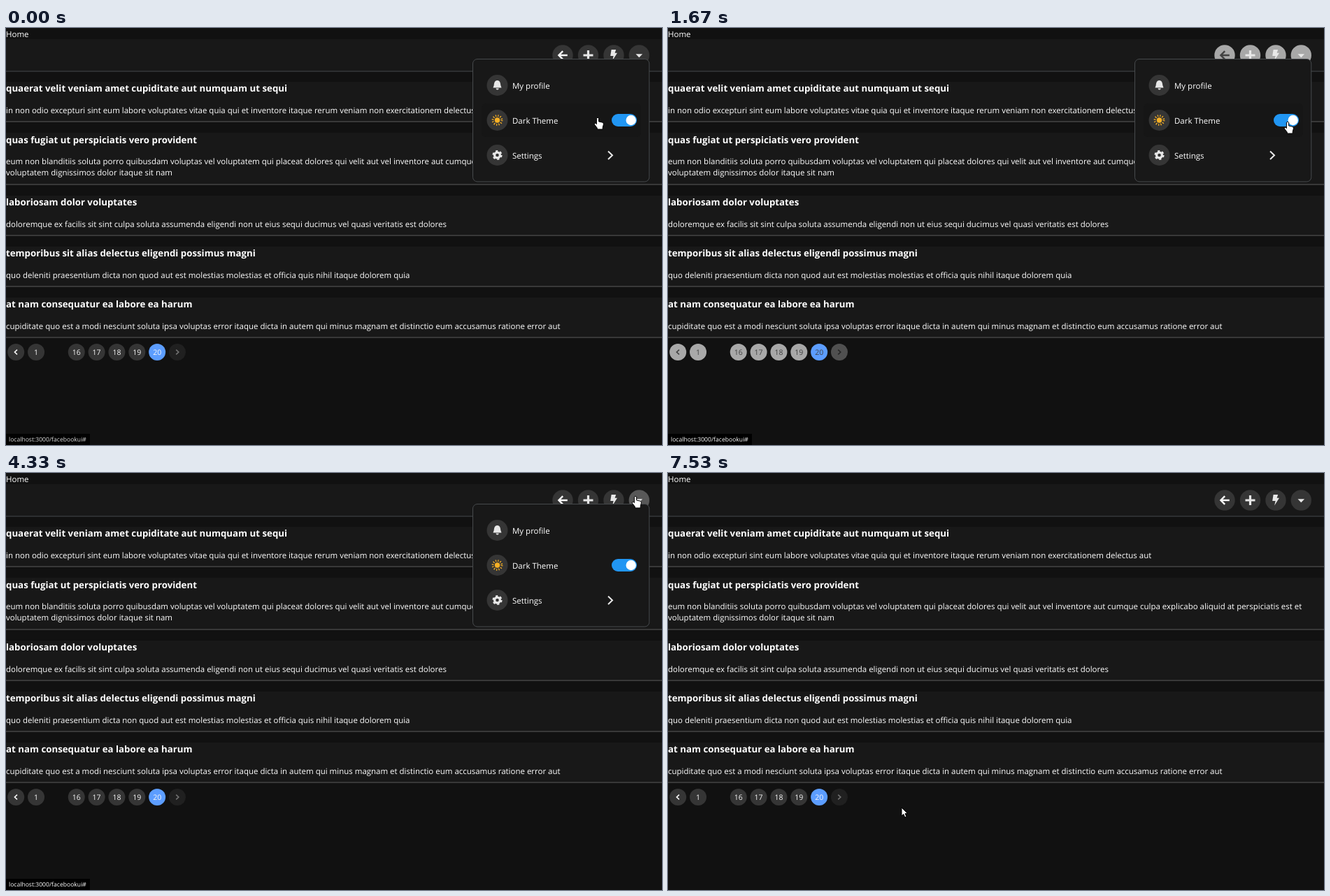
An HTML page that plays this animation: 938x597 px, repeating every 7940 ms.

```html
<!DOCTYPE html>
<html lang="en">
<head>
<meta charset="utf-8">
<title>Dropdown menu and pagination</title>
<style>
html, body { margin: 0; width: 100%; height: 100%; overflow: hidden; background: #111; }
svg { display: block; width: 938px; height: 597px; font: 11.48px "Open Sans", "Noto Sans", sans-serif; text-rendering: geometricPrecision; }
text { fill: var(--ink); white-space: pre; }
.title { font-size: 13.28px; font-weight: 700; }
.page { fill: var(--page); }
.card { fill: var(--card); }
.rule { fill: var(--rule); }
.btn { fill: var(--btn); }
.disc { fill: var(--disc); }
.fade { fill: none; stroke: var(--fade); }
.icon { fill: var(--icon); }
.line { fill: none; stroke: var(--icon); }
.pager text { font-size: 10.5px; text-anchor: middle; fill: var(--fade); }
.pager circle { stroke: var(--ring); }
.pager .dots { fill: var(--dots); }
.status { font-size: 8.6px; fill: #fff; }
</style>
</head>
<body>
<svg id="stage" viewBox="0 0 938 597"></svg>
<script>
const LOOP = 7940;
const SLIDE = 248;
const stage = document.getElementById('stage');

const lastPage = [
  ['quaerat velit veniam amet cupiditate aut numquam ut sequi',
    'in non odio excepturi sint eum labore voluptates vitae quia qui et inventore itaque rerum veniam non exercitationem delectus aut'],
  ['quas fugiat ut perspiciatis vero provident',
    'eum non blanditiis soluta porro quibusdam voluptas vel voluptatem qui placeat dolores qui velit aut vel inventore aut cumque culpa explicabo aliquid at perspiciatis est et',
    'voluptatem dignissimos dolor itaque sit nam'],
  ['laboriosam dolor voluptates',
    'doloremque ex facilis sit sint culpa soluta assumenda eligendi non ut eius sequi ducimus vel quasi veritatis est dolores'],
  ['temporibus sit alias delectus eligendi possimus magni',
    'quo deleniti praesentium dicta non quod aut est molestias molestias et officia quis nihil itaque dolorem quia'],
  ['at nam consequatur ea labore ea harum',
    'cupiditate quo est a modi nesciunt soluta ipsa voluptas error itaque dicta in autem qui minus magnam et distinctio eum accusamus ratione error aut'],
];
const otherPage = [
  ['placeat quia et porro iste',
    'quasi excepturi consequatur iste autem temporibus sed molestiae beatae et quaerat et esse ut voluptatem occaecati et vel explicabo autem asperiores pariatur deserunt optio'],
  ['nostrum quis quasi placeat',
    'eos et molestiae nesciunt ut a dolores perspiciatis repellendus repellat aliquid magnam sint rem ipsum est'],
  ['sapiente omnis fugit eos',
    'consequatur omnis est praesentium ducimus non iste neque hic deserunt voluptatibus veniam cum et rerum sed'],
  ['sint soluta et vel magnam aut ut sed qui',
    'repellat aut aperiam totam temporibus autem et architecto magnam ut consequatur qui cupiditate rerum quia soluta dignissimos nihil iure tempore quas est'],
  ['ad iusto omnis odit dolor voluptatibus',
    'minus omnis soluta quia qui sed adipisci voluptates illum ipsam voluptatem eligendi officia ut in eos soluta similique molestias praesentium blanditiis'],
];

// Markup helpers
const rect = (x, y, w, h, attrs = '') => `<rect x="${x}" y="${y}" width="${w}" height="${h}" ${attrs}/>`;
const label = (x, y, s, attrs = '') => `<text x="${x}" y="${Math.round(y)}" ${attrs}>${s}</text>`;
const at = (x, y, body, attrs = '') => `<g transform="translate(${x} ${y})" ${attrs}>${body}</g>`;

function posts(list) {
  let y = 77;
  return list.map(([title, ...lines]) => {
    const extra = lines.length - 1;
    const edge = Math.round(y + 56.3 + 16.2 * extra);
    const top = Math.round(y);
    const out = rect(0, top, 938, edge - top, 'class="card"') +
      rect(0, edge, 938, 2, 'class="rule"') +
      label(0, y + 14.3, title, 'class="title"') +
      lines.map((s, i) => label(0, y + 45 + 16 * i, s)).join('');
    y += 73.2 + 16.2 * extra;
    return out;
  }).join('');
}

const arrowLeft = '<path d="M6.8 0H-5.4M.2 -5.8L-5.6 0L.2 5.8" stroke-width="2.4"/>';
const gear = `<circle r="3.9" class="line" stroke-width="3.2"/>
  <circle r="5.9" class="line" stroke-width="2.4" stroke-dasharray="3.1 3.08"/>`;
const bell = '<path class="icon" d="M0 -7C4 -7 4.5 -3 4.8 0L6 3.5H-6L-4.8 0C-4.5 -3 -4 -7 0 -7ZM-2 4.5H2.2A2 2 0 0 1 -2 4.5Z"/>';
const sun = `<g id="sun"><circle r="3.7" stroke="none"/>
  <circle r="6.4" fill="none" stroke-width="3" stroke-dasharray="1.2 2.15"/></g>`;

const navIcons = [
  `<g class="fade">${arrowLeft}</g>`,
  '<path class="line" d="M-7 0H7M0 -7V7" stroke-width="3.2"/>',
  '<path class="icon" d="M-3.4 -8H3.2L1.6 -3.2H5L-1.8 7.6L-.4 1H-4.8Z"/>',
  '<path class="icon" d="M-4.8 -1.8H4.8L0 3.2Z"/>',
];
const navX = [796, 832.5, 869, 905.3];

const menuItem = (i, text, icon = '') =>
  at(702.5, 82 + 50 * i, `<circle r="15" class="disc"/>${icon}`) + label(724, 87 + 50 * i, text);

const primary = menuItem(0, 'My profile', bell) + menuItem(1, 'Dark Theme', sun) + menuItem(2, 'Settings', gear) +
  '<path class="line" d="M861 176.5L867 182.3L861 188" stroke-width="2"/>' +
  rect(866, 123, 36, 18, 'rx="9" id="track"') + '<circle id="knob" cy="132" r="7.2" fill="#fff"/>';
const secondary = menuItem(0, 'Settings', `<g class="line">${arrowLeft}</g>`) +
  [1, 2, 3, 4, 5].map(i => menuItem(i, 'Temp')).join('');

const pagerX = i => 14.2 + 28.85 * i;
const pageButton = (i, body, attrs = '') => at(pagerX(i), 0, `<circle r="12" class="btn"/>${body}`, attrs);
const chevron = d => `<path class="fade" stroke-width="1.6" d="M${-1.8 * d} -3.4L${1.8 * d} 0L${-1.8 * d} 3.4"/>`;
const numbers = [[1, 1], [3, 16], [4, 17], [5, 18], [6, 19], [7, 20]];
const pager = pageButton(0, chevron(-1)) +
  numbers.map(([i, n]) => pageButton(i, label(0, 4, n), `id="p${n}"`)).join('') +
  label(pagerX(2), 4, '...', 'class="dots"') + pageButton(8, chevron(1), 'id="next"');

stage.innerHTML = `
  <clipPath id="clip"><rect id="clipBox" x="668" y="45" width="251.5" rx="6"/></clipPath>
  ${rect(0, 0, 938, 597, 'class="page"')}
  ${label(0, 13, 'Home')}
  ${rect(0, 16, 938, 46, 'class="card"')}
  ${rect(0, 61.5, 938, 1, 'fill="var(--edge)"')}
  ${navX.map((x, i) => at(x, 39, `<circle r="14.7" class="btn nav"/>${navIcons[i]}`)).join('')}
  <g id="last">${posts(lastPage)}</g>
  <g id="other">${posts(otherPage)}</g>
  <g id="pager" class="pager">${pager}</g>
  <g id="menu">
    ${rect(667.5, 44.5, 252.3, 0, 'rx="6.5" id="panel" class="card" stroke="var(--edge)"')}
    <g clip-path="url(#clip)">
      ${rect(680, 0, 228, 48, 'rx="6" id="hover" fill="var(--hover)"')}
      <g id="primary">${primary}</g>
      <g id="secondary">${secondary}</g>
    </g>
  </g>
  <g id="status">${rect(0, 581, 120, 16, 'fill="#000"')}${label(4, 592, 'localhost:3000/facebookui#', 'class="status"')}</g>
  <g id="cursor" fill="#fff" stroke="#000" stroke-linejoin="round">
    <path id="hand" d="M-1.6 1.2Q0 -.8 1.6 1.2V6L7 7.2Q8.6 7.8 8.4 10L7.2 14.5V17H-.6L-.8 15L-4.6 10.2Q-5 8 -3.2 8.2L-1.6 9.6Z"/>
    <path id="arrow" d="M0 0V12L2.8 9.4L4.8 14L7 13L5 8.6H8.6Z"/>
  </g>`;

const el = Object.fromEntries([...stage.querySelectorAll('[id]')].map(n => [n.id, n]));
const nav = [...stage.querySelectorAll('.nav')];

// Timing helpers
const mix = (a, b, k) => a + (b - a) * k;
const clamp = v => Math.min(1, Math.max(0, v));
const grey = v => `rgb(${[v, v, v].map(Math.round)})`;
const within = (t, a, b) => t >= a && t < b;

// The CSS "ease" curve
function ease(x) {
  if (x <= 0 || x >= 1) return clamp(x);
  let lo = 0, hi = 1;
  for (let i = 0; i < 20; i++) {
    const s = (lo + hi) / 2, r = 1 - s;
    if (0.75 * s * r * r + 0.75 * s * s * r + s ** 3 < x) lo = s; else hi = s;
  }
  const r = 1 - lo;
  return 0.3 * lo * r * r + 3 * lo * lo * r + lo ** 3;
}
const ramp = (t, start, span) => ease((t - start) / span);
const pulse = (t, on, off, span) => ramp(t, on, span) - ramp(t, off, span);

const path = [
  [70, 846, 128], [270, 862, 124], [530, 886, 134], [1690, 886, 134],
  [2230, 842, 176], [2400, 842, 176], [2730, 806, 112], [3100, 722, 78],
  [3560, 722, 78], [3700, 718, 80], [3870, 718, 80], [4270, 899, 34], [4330, 900, 33],
  [4640, 900, 33], [5330, 260, 420], [5600, 164, 463], [5740, 172, 465],
  [6150, 182, 463], [6330, 213, 447], [6520, 213, 447], [6850, 208, 474],
  [7200, 190, 466], [7530, 334, 479],
];

function cursorAt(t) {
  const i = path.findIndex(p => p[0] > t);
  if (i === 0) return path[0].slice(1);
  if (i < 0) return path[path.length - 1].slice(1);
  const [a, b] = [path[i - 1], path[i]];
  const u = (t - a[0]) / (b[0] - a[0]);
  const k = u * u * (3 - 2 * u);
  return [mix(a[1], b[1], k), mix(a[2], b[2], k)];
}

const themes = {
  dark: { page: '#111', card: '#181818', rule: '#383838', edge: '#474a4d', ink: '#fff', disc: '#353535',
    icon: '#e8e8e8', ring: 'none', dots: 'none', hover: '#161616' },
  light: { page: '#f2f2f2', card: '#e6e6e6', rule: '#cdcdcd', edge: '#555', ink: '#000', disc: '#cfcfcf',
    icon: '#050505', ring: '#999', dots: '#666', hover: '#e6e6e6' },
};

const show = (node, on) => node.setAttribute('display', on ? 'inline' : 'none');
const set = (node, name, value) => node.setAttribute(name, value);
const move = (node, x, y = 0) => set(node, 'transform', `translate(${x} ${y})`);

function render(t) {
  const light = within(t, 860, 1660);
  const glow = pulse(t, 850, 1635, 200);
  const btn = mix(53, 206, glow);
  const [x, y] = cursorAt(t);

  for (const [k, v] of Object.entries(themes[light ? 'light' : 'dark'])) stage.style.setProperty('--' + k, v);
  stage.style.setProperty('--btn', grey(btn));
  stage.style.setProperty('--fade', grey(mix(248, 5, glow)));
  set(el.sun, 'fill', light ? '#ffcb4a' : '#f7b025');
  set(el.sun, 'stroke', light ? '#ffcb4a' : '#f7b025');
  set(el.track, 'fill', light ? '#ccc' : '#2196f3');
  set(el.knob, 'cx', light ? 875.5 : 893.7);

  nav.forEach((n, i) => {
    const over = Math.hypot(x - navX[i], y - 39) < 14.7;
    n.style.fill = over ? grey(88) : '';
  });

  // Menu slide and height
  const slide = pulse(t, 2380, 3830, 500);
  const height = 175.5 + 150 * pulse(t, 2380, 3830, 330);
  show(el.menu, t < 4600);
  set(el.panel, 'height', height);
  set(el.clipBox, 'height', height - 1);
  move(el.primary, -SLIDE * slide);
  move(el.secondary, SLIDE * (1 - slide));
  show(el.primary, slide < 1);
  show(el.secondary, slide > 0);
  const row = Math.floor((y - 57) / 50);
  show(el.hover, row >= 0 && x > 680 && x < 908);
  set(el.hover, 'y', 58 + 50 * row);

  // Posts and pagination
  const other = within(t, 5765, 6500);
  const active = pulse(t, 5765, 6500, 200);
  show(el.last, !other);
  show(el.other, other);
  move(el.pager, 0, other ? 448 : 464);
  const blue = k => `rgb(${[92, 157, 255].map(c => Math.round(mix(btn, c, k)))})`;
  el.p18.firstChild.style.fill = blue(active);
  el.p20.firstChild.style.fill = blue(1 - active);
  set(el.next, 'opacity', other ? 1 : 0.42);
  const sliding = within(t, 2460, 2900) || within(t, 3830, 4300);
  el.pager.style.fontWeight = sliding ? 700 : 400;

  // Status line and pointer
  show(el.status, t < 4720);
  set(el.status, 'opacity', mix(0.85, 1, clamp(t / 200)));
  const hand = t < 4680 || within(t, 5540, 5765) || within(t, 6260, 6500) || within(t, 7130, 7290);
  show(el.hand, hand);
  show(el.arrow, !hand);
  move(el.cursor, x.toFixed(1), y.toFixed(1));
}

const began = performance.now();
function tick() {
  render((performance.now() - began) % LOOP);
  requestAnimationFrame(tick);
}
tick();
</script>
</body>
</html>
```
